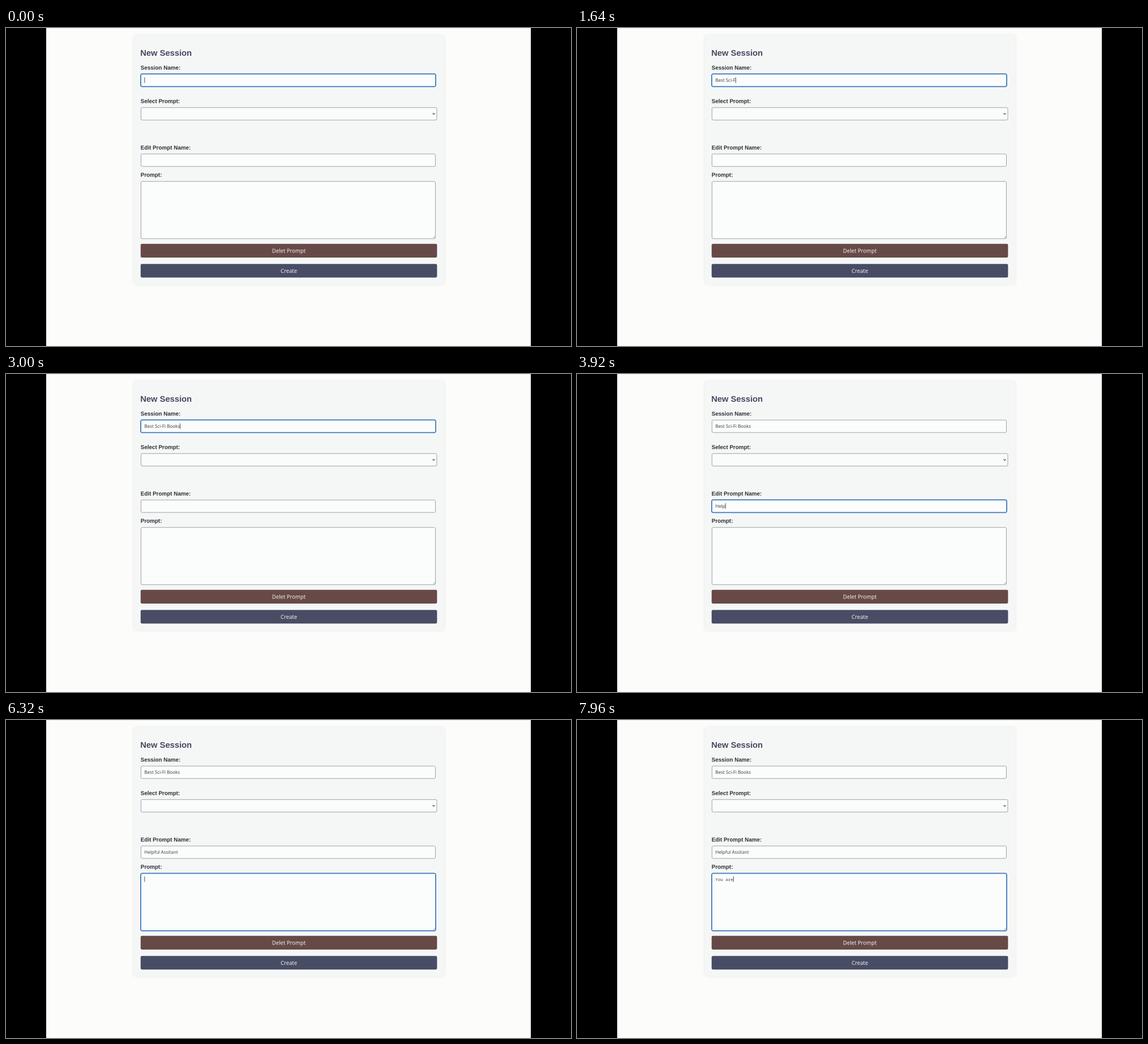
An HTML page with a canvas for the animation above (8 s loop, 998 by 561 pixels).

```html
<!DOCTYPE html>
<html lang="en">
<head>
<meta charset="utf-8">
<title>New Session</title>
<style>
html, body { margin: 0; width: 100%; height: 100%; overflow: hidden; background: #000; }
canvas { display: block; width: 998px; height: 561px; }
</style>
</head>
<body>
<canvas id="stage"></canvas>
<script>
const W = 998, H = 561, LOOP = 8000, BLINK = 500;
const SCALE = 2; // finer backing store keeps small text unhinted
const stage = document.getElementById('stage');
stage.width = W * SCALE;
stage.height = H * SCALE;
const ctx = stage.getContext('2d');
ctx.scale(SCALE, SCALE);

const SANS = '"Noto Sans", sans-serif';
const MONO = '"Noto Sans Mono", monospace';
const BOLD = '"Liberation Sans", Arial, sans-serif';

// keys: the time at which each character appears
const fields = [
  { x: 238, y: 81, w: 520.5, h: 22, base: 95, font: '8px ' + SANS, focus: -420,
    text: 'Best Sci-Fi Books',
    keys: [520, 600, 680, 760, 880, 1040, 1160, 1280, 1400, 1560, 1720, 1880, 2240, 2320, 2400, 2480, 2600] },
  { x: 238, y: 222, w: 520.5, h: 22, base: 235.8, font: '8px ' + SANS, focus: 3040,
    text: 'Helpful Assitant',
    keys: [3360, 3560, 3720, 3880, 4000, 4200, 4440, 4720, 5040, 5280, 5360, 5480, 5640, 5760, 5880, 6000] },
  { x: 238, y: 270.5, w: 520.5, h: 101, base: 283.8, font: '7.5px ' + MONO, focus: 6160,
    text: 'You are',
    keys: [7120, 7240, 7360, 7480, 7600, 7720, 7840] }
];

function box(x, y, w, h, r, fill, stroke, line) {
  ctx.beginPath();
  ctx.roundRect(x, y, w, h, r);
  if (fill) { ctx.fillStyle = fill; ctx.fill(); }
  if (stroke) { ctx.strokeStyle = stroke; ctx.lineWidth = line; ctx.stroke(); }
}

function label(text, x, y, font, color, align = 'left') {
  ctx.font = font;
  ctx.fillStyle = color;
  ctx.textAlign = align;
  ctx.fillText(text, x, y);
}

function polyline(color, width, ...pts) {
  ctx.beginPath();
  pts.forEach(([x, y]) => ctx.lineTo(x, y));
  ctx.strokeStyle = color;
  ctx.lineWidth = width;
  ctx.stroke();
}

function frameBox(f, focused) {
  if (focused) box(f.x, f.y, f.w + 0.5, f.h + 0.4, 2.5, '#fbfdfd', '#3f78bd', 1.8);
  else box(f.x + 0.4, f.y + 0.2, f.w - 0.4, f.h, 2.5, '#fbfdfc', '#96969b', 0.9);
}

function drawField(f, t, focused) {
  frameBox(f, focused);
  const count = f.keys.filter(k => k <= t).length;
  const typed = f.text.slice(0, count);
  label(typed, 244.4, f.base, f.font, '#45454b');
  if (!focused) return;
  const last = count ? f.keys[count - 1] : f.focus;
  if ((t - last) % (2 * BLINK) < BLINK) {
    const x = 244.4 + ctx.measureText(typed).width;
    ctx.fillStyle = '#38383d';
    ctx.fillRect(x, f.base - 7.8, 0.9, 9.6);
  }
}

function button(text, y, h, color, base) {
  box(237.8, y, 523.6, h, 2.5, color);
  label(text, 499.6, base, '9.5px ' + SANS, '#eeeef0', 'center');
}

function drawPage() {
  ctx.fillStyle = '#000';
  ctx.fillRect(0, 0, W, H);
  ctx.fillStyle = '#fcfdfb';
  ctx.fillRect(71, 0, 856, H);
  ctx.fillStyle = '#f1f1f2';
  ctx.fillRect(71, 0, 856, 1);

  ctx.save();
  ctx.shadowColor = 'rgba(0, 0, 0, 0.09)';
  ctx.shadowBlur = 6 * SCALE;
  box(226, 13, 548, 439, 5, '#f5f7f7');
  ctx.restore();

  label('New Session', 237.2, 49, 'bold 14.75px ' + BOLD, '#48485f');
  const names = [['Session Name:', 73.3], ['Select Prompt:', 132.4],
                 ['Edit Prompt Name:', 214.3], ['Prompt:', 262.4]];
  for (const [text, y] of names) label(text, 237.8, y, 'bold 9.83px ' + BOLD, '#303035');

  box(238.4, 140.3, 522.6, 22, 2.5, '#fafcfb', '#96969b', 0.9);
  polyline('#4b4b50', 1.1, [753.4, 150.3], [755.5, 152.4], [757.6, 150.3]);
  button('Delet Prompt', 380.7, 24.3, '#674a47', 396.6);
  button('Create', 416.2, 24, '#484d65', 432);
}

function draw(t) {
  drawPage();
  const active = fields.filter(f => f.focus <= t).length - 1;
  fields.forEach((f, i) => drawField(f, t, i === active));
  polyline('#9a9a9e', 0.7, [754.6, 370.3], [757.6, 367.3]);
  polyline('#9a9a9e', 0.7, [756.6, 370.5], [757.8, 369.3]);
}

const start = performance.now();
function tick() {
  draw((performance.now() - start) % LOOP);
  requestAnimationFrame(tick);
}
tick();
</script>
</body>
</html>
```
